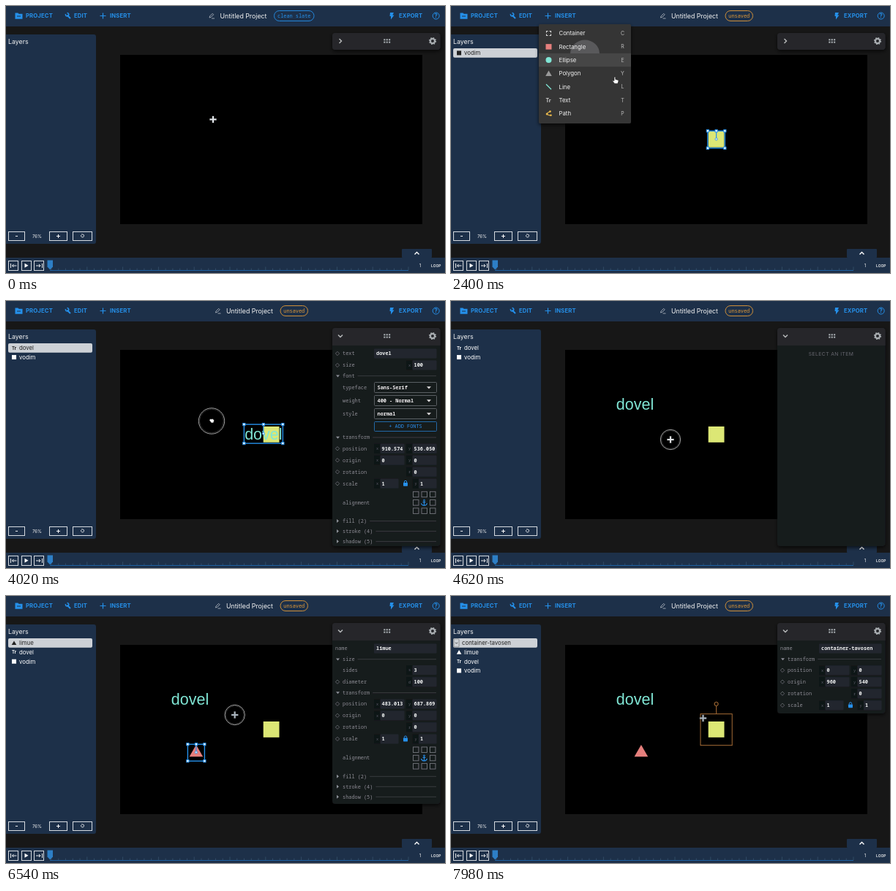
An HTML page for the animation above (8 s loop, 600 by 366 pixels).

```html
<!DOCTYPE html>
<html lang="en">
<head>
<meta charset="utf-8">
<title>Editor demo</title>
<style>
html, body { margin: 0; width: 100%; height: 100%; overflow: hidden; background: #171717; }
svg { display: block; width: 600px; height: 366px; }
text { font-family: Inter, sans-serif; font-size: 7.8px; fill: #f2f2f2; white-space: pre; }
.nav { font-size: 7.7px; font-weight: 700; letter-spacing: .14px; fill: #2590ea; }
.title { font-size: 8.8px; }
.mono { font-family: "Noto Sans Mono", monospace; font-size: 6.9px; }
.label { fill: #8a8f94; }
.value { font-weight: 600; fill: #f2f2f2; }
.tiny { font-size: 5.2px; fill: #59636d; }
.small { font-size: 6px; }
.art { font-family: "Liberation Sans", Arial, sans-serif; font-size: 21.5px; fill: #80e6d5; }
</style>
</head>
<body>
<svg viewBox="0 0 600 366">
  <defs>
    <clipPath id="panelClip"><rect id="panelEdge" x="446" y="37" width="147.500" rx="4"/></clipPath>
    <filter id="shadow" x="-10%" y="-10%" width="120%" height="130%">
      <feDropShadow dx="0" dy="2" stdDeviation="2.500" flood-opacity=".7"/>
    </filter>
  </defs>
  <g id="fixed"></g>
  <g id="live"></g>
</svg>
<script>
const LOOP = 8000, STEP = 60;
const BAR = '#1d3049', BLUE = '#2590ea', YELLOW = '#dce775', PINK = '#e57f7c', MINT = '#80e6d5';
const NAMES = { square: 'vodim', text: 'dovel', triangle: 'limue', container: 'container-tavosen' };
const $ = id => document.getElementById(id);

// Drawing helpers
const rect = (x, y, w, h, fill, extra = '') =>
  `<rect x="${x}" y="${y}" width="${w}" height="${h}" fill="${fill}" ${extra}/>`;
const box = (x, y, w, h, stroke, extra = '') => rect(x, y, w, h, 'none', `stroke="${stroke}" ${extra}`);
const line = (d, stroke, width = 1, extra = '') =>
  `<path d="${d}" fill="none" stroke="${stroke}" stroke-width="${width}" ${extra}/>`;
const solid = (d, fill) => `<path d="${d}" fill="${fill}"/>`;
const dot = (x, y, r, fill, extra = '') => `<circle cx="${x}" cy="${y}" r="${r}" fill="${fill}" ${extra}/>`;
const text = (x, y, s, cls = '', extra = '') => `<text x="${x}" y="${y}" class="${cls}" ${extra}>${s}</text>`;
const at = (x, y, body) => `<g transform="translate(${x} ${y})">${body}</g>`;
const middle = 'text-anchor="middle"';

// Value of a track of [time, ...numbers] at time t, eased between keys
function sample(track, t) {
  const next = track.findIndex(key => key[0] > t);
  if (next === 0) return track[0].slice(1);
  if (next < 0) return track.at(-1).slice(1);
  const [a, b] = [track[next - 1], track[next]];
  const p = (t - a[0]) / (b[0] - a[0]), e = p * p * (3 - 2 * p);
  return a.slice(1).map((v, i) => v + (b[i + 1] - v) * e);
}

const cursorTrack = [
  [0, 283, 155.5], [480, 283, 155.5], [1200, 150, 14], [1380, 150, 14], [1920, 183, 56],
  [2280, 183, 56], [2400, 225, 102], [2640, 425, 72], [2760, 457, 48], [2820, 457, 48],
  [3060, 296, 162], [3600, 296, 162], [3840, 365, 184], [3900, 365, 184], [4020, 281, 164.5],
  [4320, 254, 143], [4560, 300, 190], [5100, 300, 190], [5340, 332.5, 209.5], [5580, 364, 186],
  [5640, 364, 186], [6120, 262, 218], [6420, 312.7, 163], [7080, 312.7, 163], [7620, 350, 176], [7980, 344.5, 167.5]
];
const panelTrack = [
  [2760, 60], [2940, 93], [3540, 93], [3720, 336], [4620, 336], [4800, 93], [5160, 93],
  [5340, 264], [5400, 285], [6600, 285], [6780, 93], [7260, 93], [7440, 161]
];
const textTrack = [[3960, 960, 540], [4020, 910.574, 536.05], [4320, 444, 349]];
const triangleTrack = [[5640, 960, 540], [6120, 483.013, 687.869]];
const selections = [
  ['square', 2280, 2760], ['text', 3540, 4620], ['triangle', 5160, 6600], ['container', 7260, LOOP]
];
const presses = [1320, 2760, 3900, 4560, 5640, 6480];
const drags = [[3900, 4320], [5640, 6120]];
const stagePoint = ([x, y]) => [156 + x * .2151, 67 + y * .2148];

// Icons
const triangle = (x, y, r, fill) =>
  solid(`M${x} ${y - r}L${x + r * .866} ${y + r / 2}H${x - r * .866}Z`, fill);
const plus = (x, y, r, color, width = 1) => line(`M${x - r} ${y}h${2 * r}M${x} ${y - r}v${2 * r}`, color, width);
const chevron = (x, y, turn, color = '#bbb') =>
  `<g transform="translate(${x} ${y}) rotate(${turn})">${line('M-3 -1.500L0 1.500L3 -1.500', color, 1.4)}</g>`;
const gear = dot(583, 48, 3.1, 'none', 'stroke="#a9adb1" stroke-width="2.200"') +
  dot(583, 48, 4.4, 'none', 'stroke="#a9adb1" stroke-width="1.400" stroke-dasharray="1.700 1.756"');
const lock = (x, y) => rect(x - 3, y - 1, 6, 4.8, BLUE, 'rx=".7"') +
  line(`M${x - 1.7} ${y - 1}v-1a1.700 1.700 0 0 1 3.400 0v1`, BLUE);
const anchor = (x, y) => at(x, y, dot(0, -3, 1, 'none', `stroke="${BLUE}"`) +
  line('M0 -2V4M-2 -.5H2M-4 1Q-3 4 0 4Q3 4 4 1', BLUE, 1.1));
const pencil = x => line(`M${x - 3} 16l.7-2.200l3.500-3.500l1.500 1.500l-3.500 3.500zM${x} 17h4`, '#aab2bb', .9);

function fixedScene() {
  const buttons = [[3.5, 309.5, 22, 12], [59.5, 309.5, 24, 12], [91.5, 309.5, 26, 12],
    [3.5, 349.5, 13, 13], [21.5, 349.5, 13, 13], [38.5, 349.5, 13, 13]];
  let ticks = '';
  for (let i = 0; i <= 50; i++) ticks += `M${62 + i * 9.76} 362v${i % 5 ? -2.5 : -4.5}`;
  return rect(0, 0, 600, 366, '#171717') + rect(156, 67, 413, 232, '#000') +
    rect(0, 0, 600, 28, BAR) +
    solid('M12.500 9.500h4l1 1.200h5v7h-10z', BLUE) + line('M15 14h5', BAR, 1) + text(27, 16.4, 'PROJECT', 'nav') +
    line('M83.500 12.500L88 17', BLUE, 2) + line('M81.500 11a2.200 2.200 0 1 0 2-1.500', BLUE, 1.5) + text(93, 16.4, 'EDIT', 'nav') +
    plus(132.5, 13.5, 4, BLUE, 1.2) + text(142, 16.4, 'INSERT', 'nav') +
    solid('M525 9h5l-1.700 3.500h2.200l-4.500 6v-4.500h-1.500z', BLUE) + text(537, 16.4, 'EXPORT', 'nav') +
    dot(587.7, 13.5, 4.5, 'none', `stroke="${BLUE}"`) + text(587.7, 16, '?', 'nav', middle) +
    rect(-4, 39, 127, 287, BAR, 'rx="3"') + text(3, 52, 'Layers', 'title') +
    rect(541, 333, 41, 12, BAR, 'rx="1"') + chevron(561.5, 339, 180, '#fff') +
    rect(0, 345, 600, 21, BAR) +
    buttons.map(b => box(...b, '#d5dae0')).join('') +
    line('M13 315.500h3', '#fff') + text(42.5, 317.8, '76%', 'small', middle) + plus(71.5, 315.5, 2.5, '#fff') +
    line('M102.800 314a2 2 0 1 0 2-1h-1.800', '#fff', .8) +
    line('M6.500 353v6M14.500 356h-6m2-2l-2 2l2 2', '#fff', .9) + solid('M25.500 352.800v6l5-3z', '#fff') +
    line('M49.500 353v6M41 356h6m-2-2l2 2l-2 2', '#fff', .9) +
    line(ticks, '#3c5672', .7) + line('M60 362.500H550', '#1f62a2', 1) +
    solid('M56.500 348.500h7.500v9l-3.700 4l-3.800-4z', '#2d7fc6') +
    text(566, 358.3, '1', 'small', middle) + text(581, 357.8, 'LOOP', '', 'style="font-size:5px;font-weight:600"');
}

function heading(saved) {
  const dx = saved ? 0 : 8.5, color = saved ? BLUE : '#e29a38';
  const [x, w, label] = saved ? [366.5, 54.5, 'clean slate'] : [375, 37.5, 'unsaved'];
  return pencil(281 + dx) + text(292.5 + dx, 16.8, 'Untitled Project', 'title') +
    box(x, 6.5, w, 14, color, 'rx="7" stroke-width=".900"') +
    text(x + w / 2, 15.8, label, 'mono', `${middle} style="fill:${color}"`);
}

function layerList(t, selected) {
  return selections.filter(s => t >= s[1]).reverse().map(([kind], i) => {
    const y = 64.4 + i * 12.65, on = kind === selected, color = on ? '#222' : '#fff';
    const icons = {
      square: rect(8, y - 3, 6, 6, color),
      text: text(8, y + 2.1, 'Tr', '', `style="font-size:6px;font-weight:700;fill:${color}"`),
      triangle: triangle(11, y + .8, 3.8, color),
      container: box(4, y - 5.5, 7, 11, '#777', 'rx="1" stroke-width=".700"') +
        line(`M6 ${y - .7}l1.500 1.500l1.500-1.500`, color, .8)
    };
    return (on ? rect(3, y - 6.4, 115, 12.8, '#cdd1d6', 'rx="2"') : '') + icons[kind] +
      text(kind === 'container' ? 15 : 18, y + 2.8, NAMES[kind], '', `style="fill:${color}"`);
  }).join('');
}

// Property panel rows
const FIELD = '#20272f';
const label = (y, s, keyed, x = 460) => text(x, y + 2.3, s, 'mono label') +
  (keyed ? line(`M453 ${y - 2.7}l2.700 2.700l-2.700 2.700l-2.700-2.700z`, '#6b7177', .8) : '');
const wide = (y, s) => rect(503, y - 6.5, 85.5, 13, FIELD, 'rx="1"') + text(506, y + 2.3, s, 'mono value');
const cell = (x, y, tag, s, w = 33) => rect(x, y - 6.5, 8.5, 13, '#101214') + text(x + 3, y + 1.8, tag, 'mono tiny') +
  rect(x + 8.5, y - 6.5, w, 13, FIELD, 'rx="1"') + text(x + 10.5, y + 2.3, s, 'mono value');
const pair = (y, a, b) => cell(503, y, 'x', a) + cell(547, y, 'y', b);
const section = (y, s, open = true) =>
  solid(open ? `M451 ${y - 1.3}h5l-2.500 3z` : `M452 ${y - 2.5}v5l3-2.500z`, '#8b9197') + label(y, s) +
  line(`M${464 + s.length * 4.14} ${y}H588`, '#454a4f', .7);
const dropdown = (y, name, s) => label(y, name) + box(503.5, y - 7, 85, 14, '#5a5f64', 'rx="1"') +
  text(507.5, y + 2.3, s, 'mono value') + solid(`M575 ${y - 1.3}h6l-3 3.200z`, '#ddd');

const transform = (y, position, origin) => section(y, 'transform') +
  label(y + 15.3, 'position', true) + pair(y + 15.3, ...position) +
  label(y + 31.2, 'origin', true) + pair(y + 31.2, ...origin) +
  label(y + 47.2, 'rotation', true) + cell(547, y + 47.2, 'r', '0') +
  label(y + 63.3, 'scale', true) + cell(503, y + 63.3, 'x', '1', 25) + lock(546, y + 63) + cell(555.5, y + 63.3, 'y', '1', 24.5);

function styling(y) {
  let grid = '';
  for (let i = 0; i < 9; i++)
    if (i !== 4) grid += box(556.5 + i % 3 * 11.5, y - 15 + Math.floor(i / 3) * 11.3, 7.5, 7.5, '#74797e', 'stroke-width=".900"');
  return label(y, 'alignment') + grid + anchor(571.5, y) +
    section(y + 25.3, 'fill (2)', false) + section(y + 39.3, 'stroke (4)', false) + section(y + 53.3, 'shadow (5)', false);
}

const format = v => String(+v.toFixed(3)).replace(/(\.\d\d)$/, '$10');
const panels = {
  text: t => label(72, 'text', true) + wide(72, NAMES.text) + label(88, 'size', true) + cell(547, 88, 'x', '100') +
    section(102.7, 'font') + dropdown(118.5, 'typeface', 'Sans-Serif') +
    dropdown(136.5, 'weight', '400 - Normal') + dropdown(154.5, 'style', 'normal') +
    box(503.5, 165.5, 85, 13, '#2268a6', 'rx="1"') +
    text(546, 174.3, '+ ADD FONTS', 'mono', `${middle} style="fill:${BLUE}"`) +
    transform(187, sample(textTrack, t).map(format), ['0', '0']) + styling(276.3),
  triangle: t => label(72, 'name', false, 450) + wide(72, NAMES.triangle) + section(86.7, 'size') +
    label(101.5, 'sides') + cell(547, 101.5, 's', '3') + label(117.7, 'diameter', true) + cell(547, 117.7, 'd', '100') +
    transform(132.6, sample(triangleTrack, t).map(format), ['0', '0']) + styling(222),
  container: () => label(72, 'name', false, 450) + wide(72, NAMES.container) +
    transform(86.5, ['0', '0'], ['960', '540'])
};

function panel(t, selected) {
  const [bottom] = sample(panelTrack, t), open = bottom > 61;
  $('panelEdge').setAttribute('height', bottom - 37);
  let grip = '';
  for (let i = 0; i < 6; i++) grip += rect(516.3 + i % 3 * 3.4, 45.2 + Math.floor(i / 3) * 3.4, 2.1, 2.1, '#a9adb1');
  const body = panels[selected] ? panels[selected](t) :
    text(519.5, 74.8, 'SELECT AN ITEM', '', `${middle} style="font-size:6.800px;letter-spacing:.4px;fill:#666b70"`);
  return `<g filter="url(#shadow)"><g clip-path="url(#panelClip)">` +
    rect(446, 37, 148, 300, '#191b1e', 'opacity=".960"') + rect(446, 37, 148, 24, '#25282c') +
    chevron(457, 48, open ? 0 : -90) + grip + gear + (open ? body : '') + '</g></g>';
}

function handles(x, y, w, h) {
  const left = x - w / 2, top = y - h / 2;
  const knobs = [[left, top], [left + w, top], [left, top + h], [left + w, top + h], [x, top]];
  return box(left, top, w, h, BLUE, 'stroke-width="1.400"') +
    line(`M${x} ${top}V${y - 2}`, BLUE, 1.2) +
    knobs.map(([a, b]) => rect(a - 1.6, b - 1.6, 3.2, 3.2, '#fff', `stroke="${BLUE}"`)).join('') +
    dot(x, y - .5, 1.6, '#d6eaff', `stroke="${BLUE}" stroke-width=".800"`);
}

function artwork(t, selected) {
  const [tx, ty] = stagePoint(sample(textTrack, t)), [px, py] = stagePoint(sample(triangleTrack, t));
  let out = '';
  if (t >= 2280) out += rect(351.7, 172, 21.8, 21.8, YELLOW, selected === 'square' ? 'rx="1"' : '');
  if (t >= 3540) out += text(tx, ty + 7.5, NAMES.text, 'art', middle);
  if (t >= 5160) out += triangle(px, py, 10.75, PINK);
  if (selected === 'square') out += handles(362.6, 183, 23.5, 23.5);
  if (selected === 'text') out += handles(tx, ty, 53, 26);
  if (selected === 'triangle') out += handles(px, py, 23, 23);
  if (selected === 'container') out += box(341, 161.7, 43.2, 43, '#b9793c', 'stroke-width=".900"') +
    line('M362.600 161.500V150.800', '#b9793c', .9) + dot(362.6, 148, 2.6, 'none', 'stroke="#b9793c"');
  return out;
}

function menu(t) {
  const rows = [
    ['Container', 'C', line('M-3 -1v-2h2M1 -3h2v2M3 1v2h-2M-1 3h-2v-2', '#ddd', 1.1)],
    ['Rectangle', 'R', rect(-4, -3.7, 8, 7.5, PINK)],
    ['Ellipse', 'E', dot(0, 0, 4, MINT)],
    ['Polygon', 'Y', triangle(0, 1, 5, '#999')],
    ['Line', 'L', line('M-3.500 -3.500L3.500 3.500', MINT, 1.3)],
    ['Text', 'T', text(-4, 2.6, 'Tr', '', 'style="font-size:7px;font-weight:700;fill:#ccc"')],
    ['Path', 'P', line('M2.500 -2.500Q-3 -1 -2 1Q0 3 3 2.500', '#eab94c', 1.1) +
      dot(2, -2.7, 1.3, '#eab94c') + dot(-2.3, .8, 1.5, '#eab94c') + dot(3, 2.5, 1.3, '#eab94c')]
  ];
  const [hx, hy] = sample(cursorTrack, t - STEP), hover = Math.floor((hy - 28.3) / 18.3);
  const fade = t < 1440 ? (t - 1260) / 180 : t > 2400 ? (2580 - t) / 180 : 1;
  let out = rect(120, 25, 126, 136, '#363636', 'rx="2" filter="url(#shadow)"');
  if (hover >= 0 && hover < 7 && hx < 246) out += rect(120, 28.3 + hover * 18.3, 126, 18.3, '#464646');
  if (t >= 2280) {
    const r = Math.min(20, 6 + (t - 2280) / 8.5);
    out += solid(`M${183 - r} 65a${r} ${Math.min(r, 18.5)} 0 0 1 ${2 * r} 0z`, '#59595b');
  }
  out += rows.map(([name, key, icon], i) => at(133.5, 37.5 + i * 18.3, icon +
    text(14, 2.8, name) + text(101, 2.6, key, '', `${middle} style="font-size:7px;fill:#bbb"`))).join('');
  return `<g opacity="${fade}">${out}</g>`;
}

function cursor(t) {
  const [x, y] = sample(cursorTrack, t);
  const dragging = drags.some(([a, b]) => t >= a && t < b);
  const hand = dragging || y < 35 || (t >= 1320 && t < 2580) || (x > 446 && y < 61);
  const press = presses.find(p => t >= p && t < p + 180);
  const color = t >= 5160 ? '#a9b4be' : '#e2e6ea';
  let out = '';
  if (press !== undefined) {
    const r = 9.7 + (t - press) / 15;
    out += dot(x, y, r, 'none', 'stroke="#c8c8c8" stroke-width=".800"') +
      dot(x, y, r - 1.3, 'none', 'stroke="#555" stroke-width=".600"');
  }
  if (!hand) return out + plus(x, y, 5, '#333', 3.2) + plus(x, y, 4.5, color, 2);
  const shape = dragging ? 'M-3 -1l1-2l1.500 .5l1.500-.5l1.500 .8l1 1.500l-1 3.200h-3z'
    : 'M-2 -4.500q1-1 1.800 0v3l3.500 1q1 .5 .5 2l-1 3h-4l-3-3.500q0-1.500 2.200-.5z';
  return out + at(x, y, `<path d="${shape}" fill="#fff" stroke="#111" stroke-width=".6"/>`);
}

function draw(t) {
  const selected = selections.find(([, from, to]) => t >= from && t < to)?.[0];
  $('live').innerHTML = heading(t < 2280) + layerList(t, selected) + artwork(t, selected) +
    panel(t, selected) + (t >= 1320 && t < 2580 ? menu(t) : '') + cursor(t);
}

$('fixed').innerHTML = fixedScene();
const start = performance.now();
let shown = -1;
function tick() {
  const t = Math.floor((performance.now() - start) % LOOP / STEP) * STEP;
  if (t !== shown) draw(shown = t);
  requestAnimationFrame(tick);
}
tick();
</script>
</body>
</html>
```
